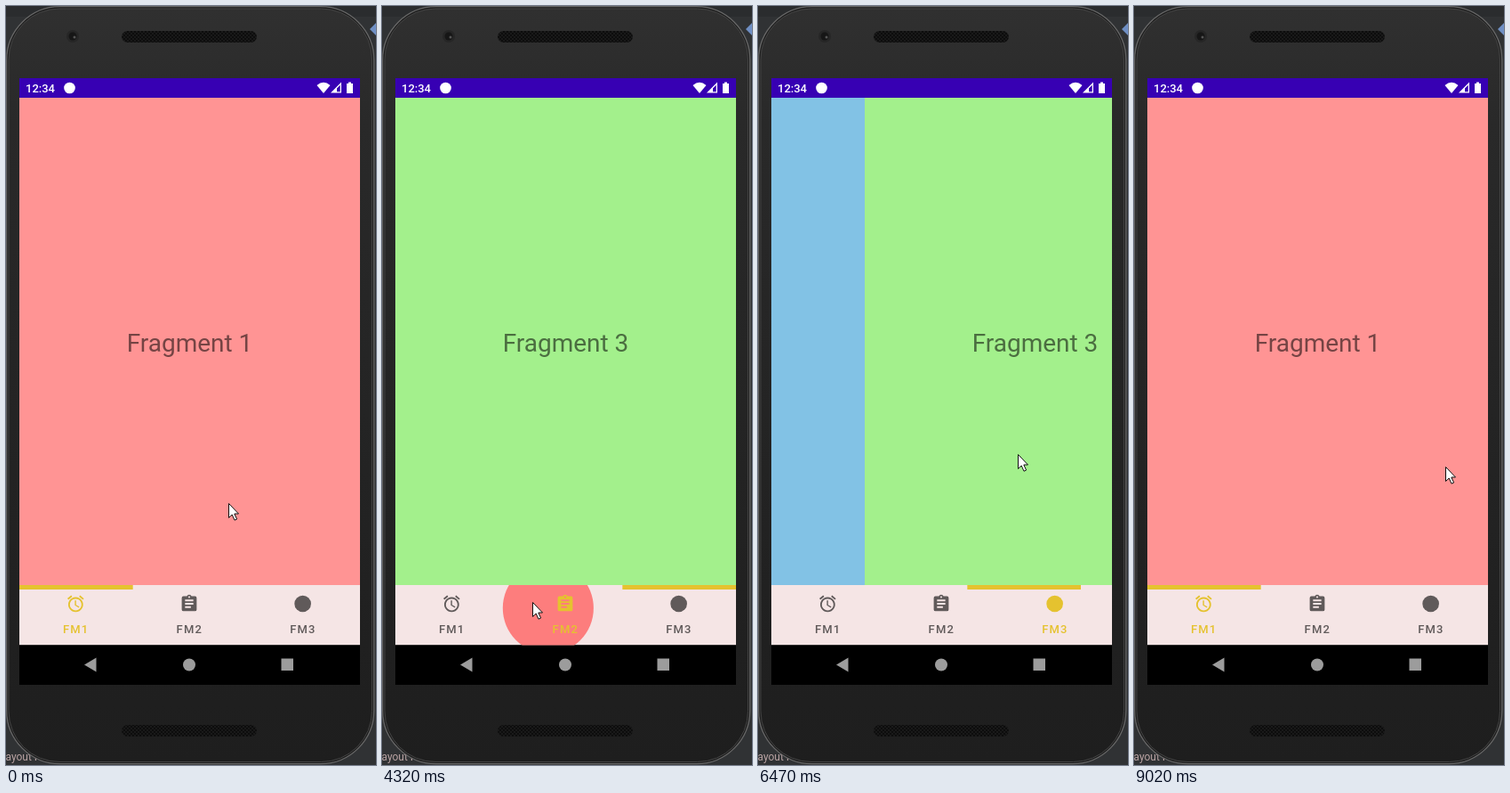
These frames come from a looping animation (416x852 px, 9340 ms). An HTML page:

```html
<!DOCTYPE html>
<html lang="en">
<head>
<meta charset="utf-8">
<title>Tabs and pager</title>
<style>
html, body { margin: 0; width: 100%; height: 100%; overflow: hidden; background: #303234; }
svg { display: block; }
text { font-family: Roboto, sans-serif; }
.page { font-size: 28px; text-anchor: middle; fill: rgba(0, 0, 0, .54); }
.label { font-size: 13px; font-weight: 500; letter-spacing: 1.16px; text-anchor: middle; }
.tab { fill: #605a5a; }
.tab.on { fill: #e5c22f; }
</style>
</head>
<body>
<svg width="100%" height="100%" viewBox="0 0 416 852">
  <defs>
    <linearGradient id="body" x2="0" y2="1">
      <stop stop-color="#303030"/><stop offset=".15" stop-color="#292929"/><stop offset="1" stop-color="#1e1e1e"/>
    </linearGradient>
    <pattern id="mesh" width="4" height="4" patternUnits="userSpaceOnUse">
      <rect width="4" height="4" fill="#191919"/>
      <circle cx="1" cy="1" r=".9" fill="#060606"/><circle cx="3" cy="3" r=".9" fill="#060606"/>
    </pattern>
  </defs>

  <rect width="416" height="852" fill="#303234"/>
  <rect width="416" height="12" fill="#2a2c2e"/>
  <path d="M409 26l7-7v14z" fill="#6f8fc4"/>
  <text x="-7" y="847" font-size="12" fill="#b9a3a3">Layout I</text>
  <rect x=".7" y=".7" width="413" height="850" rx="60" fill="#1c1c1c" stroke="#686868" stroke-width="1.3"/>
  <rect x="3" y="3" width="408.5" height="845.5" rx="57" fill="url(#body)" stroke="#444"/>
  <circle cx="75" cy="34" r="7" fill="#262626"/>
  <circle cx="75" cy="34" r="4.5" fill="#161616"/>
  <circle cx="77" cy="35" r="1.5" fill="#555"/>
  <rect x="130" y="28" width="152" height="13" rx="6.5" fill="url(#mesh)"/>
  <rect x="130" y="807" width="152" height="13" rx="6.5" fill="url(#mesh)"/>

  <rect x="15" y="81" width="383" height="22" fill="#3700b3"/>
  <g fill="#fff">
    <text x="22" y="97" font-size="13" font-weight="500">12:34</text>
    <circle cx="71.5" cy="92" r="6.3"/>
    <path d="M349.5 89Q357 82.5 364.5 89L357 98z"/>
    <path fill-rule="evenodd" d="M377 85.5V97.5H365zM375.7 88.8L372 92.5V96.2H375.7z"/>
    <path d="M383 87h2v-1.5h3V87h2v11h-7z"/>
  </g>

  <rect x="15" y="717" width="383" height="45"/>
  <g fill="#9c9c9c">
    <path d="M88 739.5L101.5 731.5V747.5z"/>
    <circle cx="206" cy="739.5" r="7"/>
    <rect x="309.5" y="732.5" width="13.5" height="13.5"/>
  </g>

  <svg x="15" y="103" width="383" height="547"><g id="pages"></g></svg>
  <svg x="15" y="650" width="383" height="67.4" viewBox="15 650 383 67.4">
    <rect x="15" y="650" width="383" height="67.4" fill="#f5e5e5"/>
    <circle id="ripple" fill="#fd7d7d"/>
    <rect id="bar" y="650" width="127.67" height="5" fill="#e5c22f"/>
    <g id="tabs"></g>
  </svg>

  <svg x="15" y="81" width="383" height="681" viewBox="15 81 383 681">
    <circle id="touch" r="12" fill="#c2df70" opacity=".93"/>
  </svg>
  <path id="cursor" d="M.5 .5V16.5L4.2 13L7 19.2L9.6 18L6.8 12H11.5z" fill="#fff" stroke="#111"/>
</svg>
<script>
const LOOP = 9340, TICK = 75, WIDTH = 383, TAB = WIDTH / 3;
const $ = id => document.getElementById(id);
const clamp = u => Math.min(1, Math.max(0, u));
const mix = (a, b, u) => a + (b - a) * u;
const smooth = u => u * u * (3 - 2 * u);
const easeOut = u => 1 - (1 - u) ** 2;
const tabX = i => 15 + TAB * (i + .5);

const icons = [
  '<path d="M22 5.72l-4.6-3.86-1.29 1.53 4.6 3.86zM7.88 3.39L6.6 1.86 2 5.71l1.29 1.53zM12.5 8H11v6l4.75 2.85.75-1.23-4-2.37zM12 4a9 9 0 1 0 .01 0zm0 16a7 7 0 1 1 .01 0z"/>',
  '<path fill-rule="evenodd" d="M19 3h-4.18a3 3 0 0 0-5.64 0H5a2 2 0 0 0-2 2v14a2 2 0 0 0 2 2h14a2 2 0 0 0 2-2V5a2 2 0 0 0-2-2zM12 3a1 1 0 1 1-.01 0zM14 17H7v-2h7zM17 13H7v-2h10zM17 9H7V7h10z"/>',
  '<circle cx="12" cy="12" r="10"/>'
];
$('pages').innerHTML = ['#ff9494', '#82c2e5', '#a3f08c'].map((fill, i) =>
  `<g transform="translate(${i * WIDTH})"><rect width="${WIDTH}" height="547" fill="${fill}"/>
   <text class="page" x="191.5" y="285">Fragment ${i + 1}</text></g>`).join('');
$('tabs').innerHTML = icons.map((icon, i) =>
  `<g class="tab"><g transform="translate(${tabX(i) - 11.7} 659.8) scale(.932)">${icon}</g>
   <text class="label" x="${tabX(i) - .2}" y="703.5">FM${i + 1}</text></g>`).join('');

// Taps on a tab and swipes across the pages, with the page each one leads to
const gestures = [
  { at: 2240, page: 2, tap: [319, 670] },
  { at: 4235, page: 1, tap: [169, 669] },
  { at: 5090, page: 2 },
  { at: 6315, page: 1 },
  { at: 7293, page: 0 }
];
// Pointer legs: start, duration, end point
const home = [250, 558];
const legs = [
  [1220, 620, 319, 670], [2240, TICK, 319, 670], [3480, 380, 210, 670], [4010, 150, 169, 669],
  [4780, 300, 238, 539], [5080, 420, 4, 522], [5530, 170, 69, 521], [5780, 390, 125, 512],
  [6320, 211, 335, 501], [6620, 540, 160, 512], [7330, 138, 345, 500], [7705, 395, 367, 516],
  [8560, 80, 361, 517], [8870, 150, 350, 517]
];

// The screen refreshes in ticks counted from the start of each leg
function snap(t) {
  const leg = legs.findLast(([at]) => at <= t);
  return leg ? t - (t - leg[0]) % TICK : 0;
}

const pointer = t => legs.reduce(([x, y], [at, ms, toX, toY]) => {
  const u = smooth(clamp((t - at) / ms));
  return [mix(x, toX, u), mix(y, toY, u)];
}, home);

// Taps start one tick late and slow down; swipes follow the finger, then settle
const position = (t, tapMs) => gestures.reduce((value, { at, page, tap }) =>
  mix(value, page, tap ? easeOut(clamp((t - at - TICK) / tapMs)) : smooth(clamp((t - at) / 450))), 0);

function selected(t) {
  const last = gestures.findLast(({ at, tap }) => at + (tap ? TICK : 180) <= t);
  return last ? last.page : 0;
}

function set(id, attrs) {
  for (const name in attrs) $(id).setAttribute(name, attrs[name]);
}

function drawRipple(t) {
  const press = gestures.findLast(g => g.tap && g.at <= t);
  if (!press) return set('ripple', { opacity: 0 });
  const age = t - press.at, u = smooth(clamp(age / 155)), [x, y] = press.tap;
  set('ripple', {
    cx: mix(x, tabX(press.page), u),
    cy: mix(y, 683.5, u),
    r: mix(32, 72, u),
    opacity: 1 - clamp((age - 180) / 170)
  });
}

function draw(now) {
  const t = snap(now % LOOP), [x, y] = pointer(t);
  set('pages', { transform: `translate(${Math.round(-position(t, 340) * WIDTH)})` });
  set('bar', { x: 15 + position(t, 225) * TAB });
  [...$('tabs').children].forEach((tab, i) => tab.classList.toggle('on', i === selected(t)));
  drawRipple(t);
  const touching = gestures.some(({ at, tap }) => !tap && t >= at && t < at + 105);
  set('touch', { cx: x, cy: y, visibility: touching ? 'visible' : 'hidden' });
  set('cursor', { transform: `translate(${Math.round(x)} ${Math.round(y)})` });
}

function frame() {
  draw(performance.now());
  requestAnimationFrame(frame);
}
frame();
</script>
</body>
</html>
```
